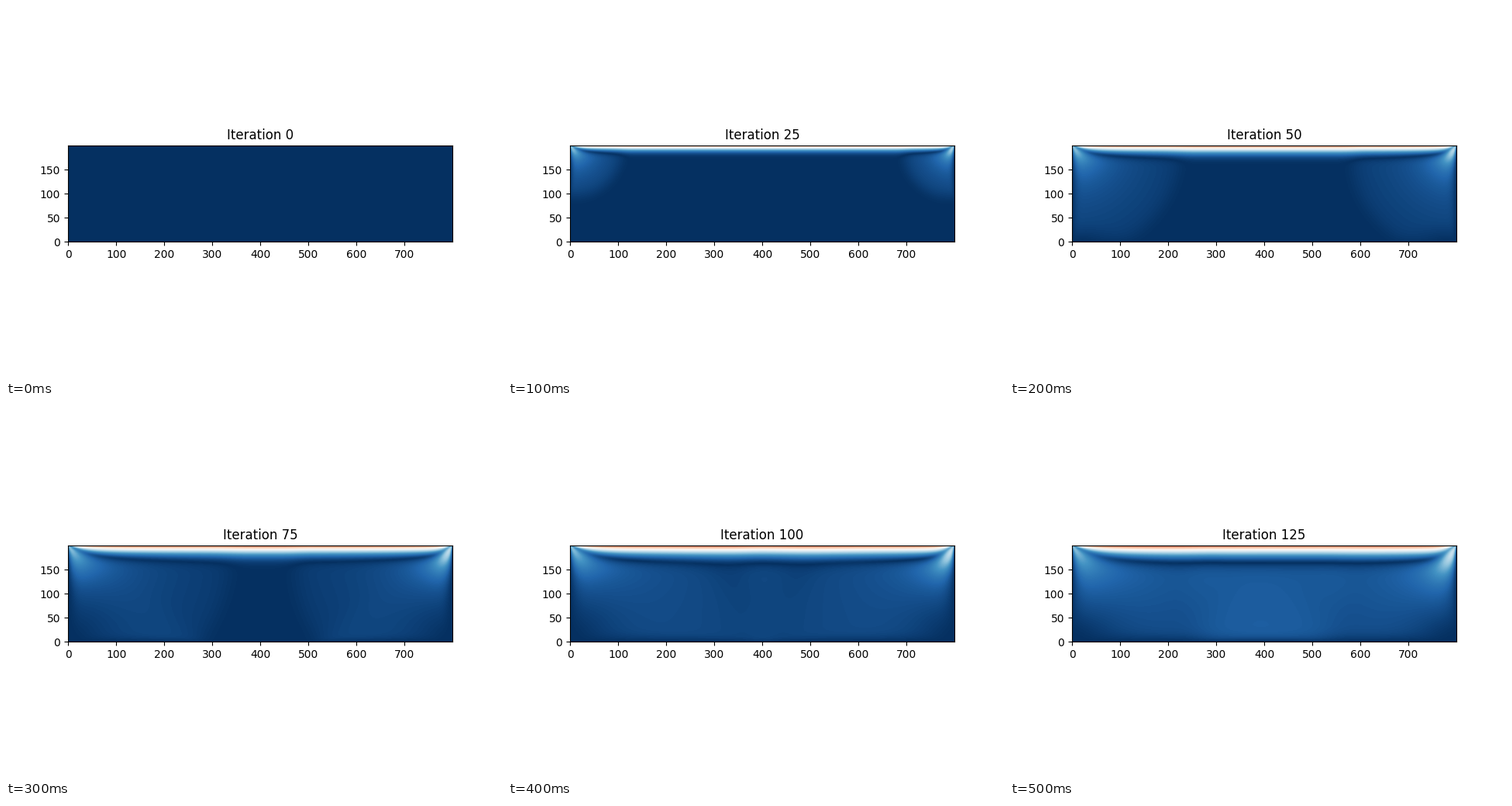
A matplotlib script that plays this animation: 640 px wide and 480 px high, repeating every 0.6 s.

```python
import numpy as np
import matplotlib.pyplot as plt
from matplotlib.animation import FuncAnimation

# Lid-driven cavity solved with a D2Q9 lattice Boltzmann scheme.
NX, NY = 800, 200
OMEGA = 0.8
LID_SPEED = 0.1
FRAMES, STEPS_PER_FRAME, TITLE_STEP = 6, 200, 25
BAND = 25  # rows handled together, to stay in cache

# Rest direction first, then each direction followed by its opposite.
DIRS = [(0, 0), (1, 0), (-1, 0), (0, 1), (0, -1),
        (1, 1), (-1, -1), (1, -1), (-1, 1)]
WEIGHTS = [4 / 9] + [1 / 9] * 4 + [1 / 36] * 4
OPPOSITE = [0, 2, 1, 4, 3, 6, 5, 8, 7]


def moments(f):
    rho = f.sum(axis=0)
    diag, anti = f[5] - f[6], f[7] - f[8]
    ux = (f[1] - f[2] + diag + anti) / rho
    uy = (f[3] - f[4] + diag - anti) / rho
    return rho, ux, uy


def collide(f):
    rho, ux, uy = moments(f)
    base = 1 - 1.5 * (ux * ux + uy * uy)
    rho *= OMEGA
    f *= 1 - OMEGA
    f[0] += WEIGHTS[0] * rho * base
    for i, cu in zip((1, 3, 5, 7), (ux, uy, ux + uy, ux - uy)):
        scaled = WEIGHTS[i] * rho
        even = scaled * (base + 4.5 * cu * cu)
        odd = 3 * scaled * cu
        f[i] += even + odd
        f[i + 1] += even - odd


def stream(src, dst):
    for i, (cx, cy) in enumerate(DIRS):
        dst[i, 1:-1, 1:-1] = src[i, 1 - cy:NY + 1 - cy, 1 - cx:NX + 1 - cx]
    # Half-way bounce-back; the top wall also hands over its momentum.
    for i, (cx, cy) in enumerate(DIRS):
        back = src[OPPOSITE[i]]
        if cx:
            col = 1 if cx > 0 else NX
            dst[i, 1:-1, col] = back[1:-1, col]
        if cy > 0:
            dst[i, 1, 1:-1] = back[1, 1:-1]
    for i, (cx, cy) in enumerate(DIRS):
        if cy < 0:
            push = 6 * WEIGHTS[i] * cx * LID_SPEED
            dst[i, NY, 1:-1] = src[OPPOSITE[i], NY, 1:-1] + push


def simulate():
    f = np.empty((9, NY + 2, NX + 2), dtype=np.float32)
    f[:] = np.array(WEIGHTS)[:, None, None]
    spare = f.copy()
    fields = [np.zeros((NY, NX))]
    for _ in range(FRAMES - 1):
        for _ in range(STEPS_PER_FRAME):
            for row in range(1, NY + 1, BAND):
                collide(f[:, row:row + BAND, 1:-1])
            stream(f, spare)
            f, spare = spare, f
        _, ux, uy = moments(f[:, 1:-1, 1:-1])
        fields.append(np.hypot(ux, uy))
    return fields


fields = simulate()
fig, ax = plt.subplots(figsize=(6.4, 4.8), dpi=100)
image = ax.imshow(fields[0], origin="lower", cmap="RdBu_r",
                  vmin=0, vmax=1.14 * LID_SPEED)
title = ax.set_title("Iteration 0")


def update(frame):
    image.set_data(fields[frame])
    title.set_text(f"Iteration {frame * TITLE_STEP}")
    return image, title


anim = FuncAnimation(fig, update, frames=FRAMES, interval=100,
                     repeat=True, repeat_delay=0)
plt.show()
```
